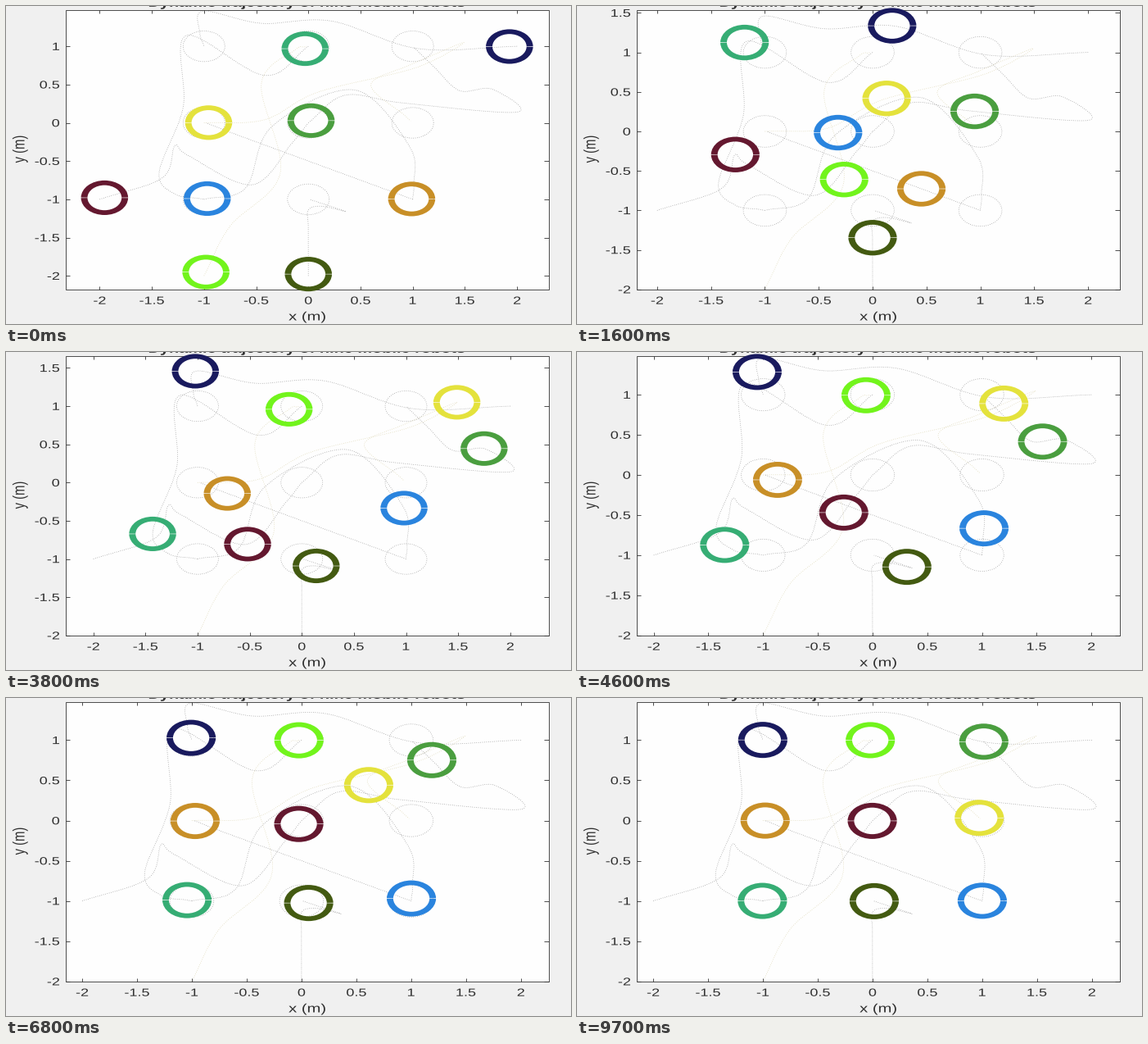
A matplotlib script for the animation above (9800 ms loop, 690x388 px).

```python
import numpy as np
import matplotlib.pyplot as plt
from matplotlib.animation import FuncAnimation
from matplotlib.collections import LineCollection
from matplotlib.patches import PathPatch, Rectangle, Wedge
from matplotlib.textpath import TextPath
from matplotlib.transforms import Affine2D

W, H, DPI = 690, 388, 100
FRAMES, STEP = 98, 100
ASPECT = 1.365          # the whole page is shown wider than it was drawn
LEFT, RIGHT = 72.5 / ASPECT, 662.7 / ASPECT
BOTTOM, TOP = H - 345.8, H - 4.8
MIDDLE = (LEFT + RIGHT) / 2
RADIUS, RIM, STROKE, TICK = 0.2, 2.4, 5.8, 4.3
INK, DOTS, PALE = "#303030", "#949494", "#ddd6b2"
KNOTS, DECAY, LEAD = 9, 0.22, 0.05
XTICKS = np.arange(-2, 2.1, 0.5)
YTICKS = np.arange(-2, 1.6, 0.5)

fig = plt.figure(figsize=(W / DPI, H / DPI), dpi=DPI, facecolor="#f0f0f0")
ax = fig.add_axes([0, 0, 1, 1])
ax.set_xlim(0, W / ASPECT)
ax.set_ylim(0, H)
ax.axis("off")
ax.add_patch(Rectangle((LEFT, BOTTOM), RIGHT - LEFT, TOP - BOTTOM,
                       fc="#fefefe", ec=INK, lw=0.6, zorder=1))
view = Affine2D()       # data to page, refreshed every frame


def label(text, x, y, size, ha=0.5, weight="normal", angle=0):
    font = {"family": "Liberation Sans", "weight": weight}
    path = TextPath((0, 0), text, size=size, prop=font)
    box = path.get_extents()
    path = Affine2D().translate(-box.x0 - ha * box.width, 0).rotate_deg(angle).transform_path(path)
    place = Affine2D().translate(x, y)
    patch = PathPatch(path, fc=INK, lw=0, transform=place + ax.transData, zorder=4)
    ax.add_patch(patch)
    return place, patch


def dotted(points, color=DOTS):
    ax.plot(*np.transpose(points), color=color, lw=0.55, ls=(0, (1, 2.2)),
            transform=view + ax.transData, zorder=2)


def pace(t):
    """Knots passed at time t; knot k is due at 0.65 k + 0.075 k^2 seconds."""
    return (np.sqrt(0.65 ** 2 + 0.3 * (t + LEAD)) - 0.65) / 0.15


class Robot:
    """Drives a smooth curve through a few points, then settles on its goal."""

    def __init__(self, color, start, goal, *via, trail=DOTS):
        knots = np.array([start, *via], float)
        goal = np.array(goal, float)
        while len(knots) < KNOTS:
            knots = np.vstack([knots, goal + DECAY * (knots[-1] - goal)])
        self.knots, self.slopes = knots, np.gradient(knots, axis=0)
        dotted([self.at(u) for u in np.linspace(0, KNOTS - 1, 500)], trail)
        self.halves = [Wedge((0, 0), 20, a + 0.9, a + 179.1, width=STROKE,
                             fc=color, lw=0, zorder=5) for a in (0, 180)]
        for half in self.halves:
            ax.add_patch(half)

    def at(self, u):
        i = min(int(u), KNOTS - 2)
        u -= i
        (p, q), (v, w) = self.knots[i:i + 2], self.slopes[i:i + 2]
        ease = u * u * (3 - 2 * u)
        return p + ease * (q - p) + u * (1 - u) * ((1 - u) * v - u * w)

    def show(self, center, radius):
        for half in self.halves:
            half.set_center(center)
            half.set_radius(radius + RIM)


turn = np.linspace(0, 2 * np.pi, 100)
circle = RADIUS * np.column_stack([np.cos(turn), np.sin(turn)])
for cx in (-1, 0, 1):
    for cy in (-1, 0, 1):
        dotted(circle + (cx, cy))

robots = [
    Robot("#191a5e", (2, 1), (-1, 1),
          (1.05, .97), (.22, 1.33), (-.45, 1.3), (-1.01, 1.46), (-1.04, 1.18)),
    Robot("#36ad74", (0, 1), (-1, -1),
          (-.42, .62), (-1.17, 1.14), (-1.2, .2), (-1.43, -.65), (-1.28, -.93)),
    Robot("#4a9e3f", (0, 0), (1, 1),
          (.35, .36), (.9, .26), (2, .14), (1.76, .44), (1.45, .42), (1.22, .71)),
    Robot("#2a84de", (-1, -1), (1, -1),
          (-.6, -.85), (-.35, -.05), (.44, .43), (.97, -.31), (1.01, -.8)),
    Robot("#e4e23c", (-1, 0), (1, 0),
          (-.42, .04), (.09, .4), (1.03, .72), (1.49, 1.05), (1, .77), (.6, .5),
          trail=PALE),
    Robot("#64182f", (-2, -1), (0, 0),
          (-1.4, -.72), (-1.28, -.3), (-1.16, -.42), (-.54, -.81), (-.16, -.27)),
    Robot("#c88f27", (1, -1), (-.98, 0),
          *[(1 - 2 * f, f - 1) for f in (.07, .26, .58, .85)]),
    Robot("#72f41c", (-1, -2), (-.02, 1),
          (-.75, -1.35), (-.27, -.66), (-.45, .51), (-.13, .95), trail=PALE),
    Robot("#435a11", (0, -2), (.01, -1),
          (0, -1.7), (0, -1.36), (0, -1.14), (.13, -1.09), (.36, -1.16)),
]

xlabels = [label(f"{v:g}", 0, 0, 13.2) for v in XTICKS]
ylabels = [label(f"{v:g}", 0, 0, 13.2, ha=1) for v in YTICKS]
label("x (m)", MIDDLE, 4.5, 14.8)
label("y (m)", 16.5, 213, 14.8, angle=90)
label("Dynamic trajectory of nine mobile robots", MIDDLE, H - 0.8, 14.6, weight="bold")
ticks = LineCollection([], colors=INK, linewidths=0.6, zorder=3)
ax.add_collection(ticks)


def fit_view(spots):
    """Tight limits around trails and rings, with equal units on both axes."""
    low = np.minimum(spots.min(axis=0) - RADIUS, (-2, -2))
    high = np.maximum(spots.max(axis=0) + RADIUS, (2.1, 1.475))
    scale = (TOP - BOTTOM) / (high[1] - low[1])
    mid = (low[0] + high[0]) / 2
    view.clear().translate(-mid, -low[1]).scale(scale).translate(MIDDLE, BOTTOM)
    return scale


def draw(frame):
    u = pace(frame * STEP / 1000)
    spots = np.array([robot.at(u) for robot in robots])
    scale = fit_view(spots)
    for robot, center in zip(robots, view.transform(spots)):
        robot.show(center, RADIUS * scale)

    lines = []
    for value, (place, _) in zip(XTICKS, xlabels):
        x = view.transform((value, 0))[0]
        place.clear().translate(x, 24.3)
        lines += [[(x, BOTTOM), (x, BOTTOM + TICK)], [(x, TOP), (x, TOP - TICK)]]
    for value, (place, patch) in zip(YTICKS, ylabels):
        y = view.transform((0, value))[1]
        inside = y <= TOP + 0.01
        patch.set_visible(inside)
        place.clear().translate(65 / ASPECT, y - 4.7)
        if inside:
            lines += [[(LEFT, y), (LEFT + TICK, y)], [(RIGHT, y), (RIGHT - TICK, y)]]
    ticks.set_segments(lines)


anim = FuncAnimation(fig, draw, frames=FRAMES, interval=STEP, repeat=True,
                     repeat_delay=0, cache_frame_data=False)
plt.show()
```
